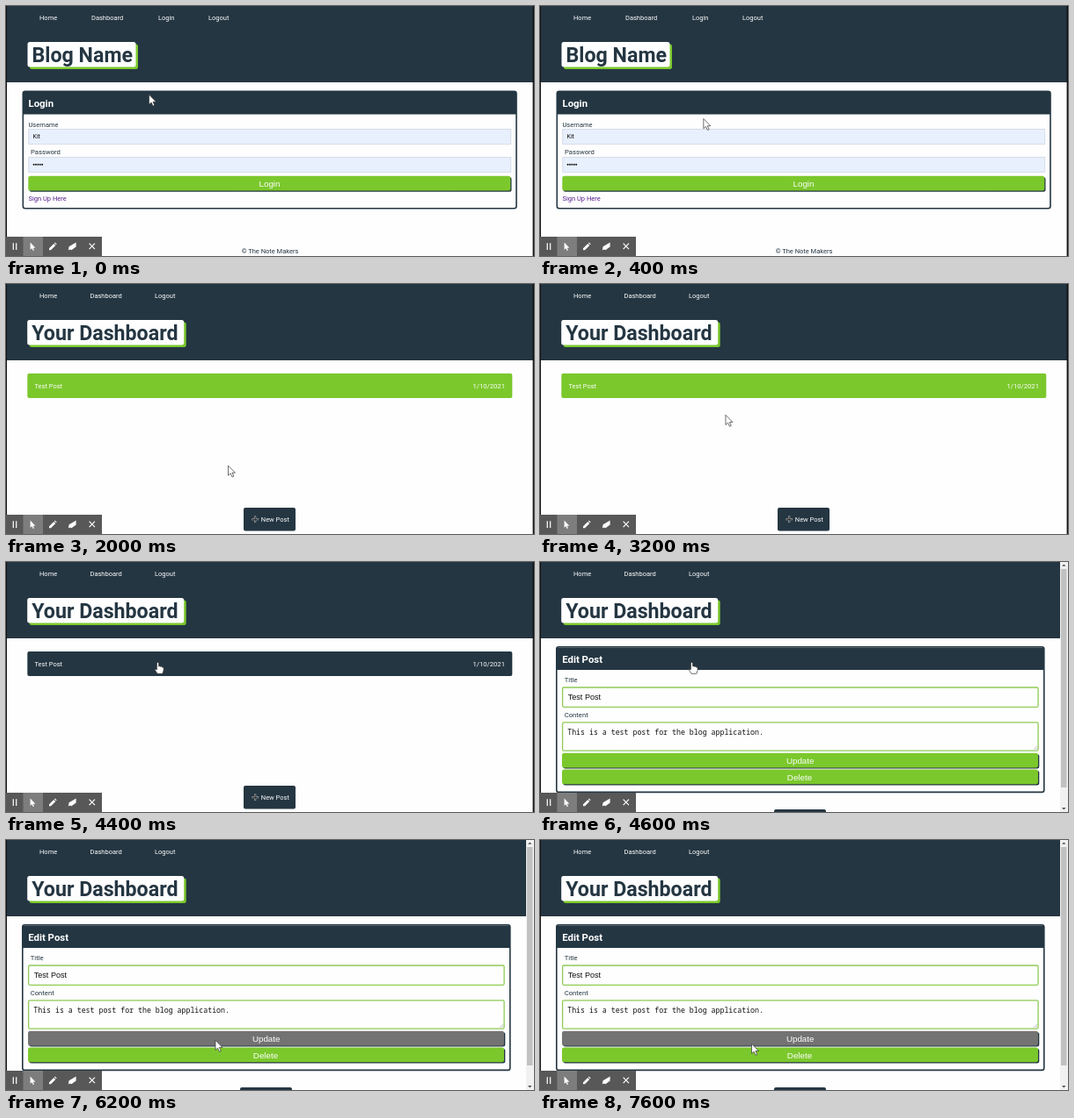
Recreate the animation shown at these times as an HTML page. Size 600x285 px, loop 8000 ms.

```html
<!DOCTYPE html>
<html lang="en">
<head>
<meta charset="utf-8">
<title>Blog walkthrough</title>
<style>
  html, body { margin: 0; width: 100%; height: 100%; overflow: hidden; background: #fefefe; }
  svg { display: block; width: 600px; height: 285px; font: 7.5px Roboto, sans-serif; fill: #243642; }
  .white { fill: #fefefe; }
  .green { fill: #7bc82c; }
  .hover { fill: #737373; }
  .post.hover { fill: #243642; }
  .title { font-size: 23.2px; font-weight: 700; }
  .head { font-size: 11.4px; font-weight: 700; fill: #fff; }
  .label { font-size: 7.7px; }
  .arial { font: 9.8px "Liberation Sans", Arial, sans-serif; }
  .mono { font: 8.25px "Noto Sans Mono", monospace; }
  .black { fill: #111; }
  .mid { text-anchor: middle; }
  .auto { fill: #e8f0fe; stroke: #c9d1de; stroke-width: .7; }
  .field { fill: #fefefe; stroke: #8fca55; stroke-width: 1.3; }
  .card { fill: #fefefe; stroke: #243642; stroke-width: 1.6; }
  .cursor { fill: #fff; stroke: #333; stroke-width: .7; stroke-linejoin: round; }
  .line { fill: none; stroke: #fff; stroke-width: 1.2; }
</style>
</head>
<body>
<svg viewBox="0 0 600 285">
  <rect width="600" height="87"/>

  <g id="login">
    <g class="white">
      <text x="38" y="16">Home</text><text x="97" y="16">Dashboard</text>
      <text x="173" y="16">Login</text><text x="230" y="16">Logout</text>
    </g>
    <rect class="green" x="27" y="43.5" width="123" height="28.5" rx="2.5"/>
    <rect class="white" x="24.5" y="41" width="123" height="28.5" rx="2.5"/>
    <text class="title" x="29.5" y="64">Blog Name</text>
    <rect class="card" x="19.3" y="97.3" width="560.7" height="133.4" rx="2.5"/>
    <path d="M20 98H580V123.5H20z"/>
    <text class="head" x="25.5" y="115">Login</text>
    <text x="25.5" y="137.5">Username</text>
    <rect class="auto" x="25.8" y="140.3" width="548" height="17"/>
    <text class="black" x="30.5" y="151" font-size="7">Kit</text>
    <text class="label" x="28" y="169">Password</text>
    <rect class="auto" x="25.8" y="172.3" width="548" height="17"/>
    <path d="M31.6 180.7H42" stroke="#111" stroke-width="2" stroke-linecap="round" stroke-dasharray="0 2.4"/>
    <rect x="26.5" y="195" width="548" height="16.7" rx="2.5"/>
    <rect id="loginBtn" class="green" x="25.3" y="193.8" width="548" height="16.6" rx="2.5"/>
    <text class="arial white mid" x="299.5" y="205.5">Login</text>
    <text x="25.5" y="221.7" fill="#551a8b">Sign Up Here</text>
    <text class="mid" x="300" y="282.3">© The Note Makers</text>
  </g>

  <g id="dash">
    <g class="white">
      <text x="38" y="16">Home</text><text x="95.5" y="16">Dashboard</text><text x="169" y="16">Logout</text>
    </g>
    <rect class="green" x="26.7" y="43.5" width="178" height="28.5" rx="2.5"/>
    <rect class="white" x="24.2" y="41" width="178" height="28.5" rx="2.5"/>
    <text class="title" x="29.2" y="64">Your Dashboard</text>
  </g>

  <g id="list">
    <rect id="post" class="post green" x="24.3" y="102" width="551" height="28" rx="2"/>
    <text class="white" x="32.5" y="119">Test Post</text>
    <text class="white label" x="567" y="119" text-anchor="end">1/10/2021</text>
    <rect x="270" y="255" width="59" height="26.5" rx="2"/>
    <path d="M279.5 268.3H287M283.2 264.6V272" stroke="#b9bec2" stroke-width="2"/>
    <path d="M280 268.3H286.5M283.2 265.1V271.5" stroke="#222"/>
    <text class="white" x="289.8" y="271">New Post</text>
  </g>

  <g id="edit">
    <rect class="card" x="18.8" y="96.8" width="554" height="165.6" rx="2.5"/>
    <path d="M19 97.5H572.5V123H19z"/>
    <text class="head" x="25.2" y="114.5" font-size="11.6">Edit Post</text>
    <text class="label" x="27.7" y="137">Title</text>
    <rect class="field" x="25.6" y="143" width="540.5" height="22.3" rx="1.5"/>
    <text class="arial black" x="31.7" y="157.3" style="font-size:9.1px">Test Post</text>
    <text class="label" x="27.7" y="177">Content</text>
    <rect class="field" x="25.6" y="182.8" width="540.5" height="32.4" rx="1.5"/>
    <path d="M561 213.8L565 209.8M563.2 213.8L565 212" stroke="#999" stroke-width=".6"/>
    <text class="mono black" x="31.2" y="197">This is a test post for the blog application.</text>
    <rect x="26.3" y="219" width="541" height="16.6" rx="2.5"/>
    <rect id="updateBtn" class="green" x="25" y="217.8" width="541" height="16.6" rx="2.5"/>
    <text class="arial white mid" x="295.7" y="229.8">Update</text>
    <rect x="26.3" y="237.8" width="541" height="16.6" rx="2.5"/>
    <rect class="green" x="25" y="236.6" width="541" height="16.6" rx="2.5"/>
    <text class="arial white mid" x="295" y="248.6">Delete</text>
    <rect x="266" y="282" width="59" height="10" rx="2"/>
    <path d="M591 0H600V285H591z" fill="#f1f1f1"/>
    <path d="M592 8H598.5V257H592z" fill="#c1c1c1"/>
    <path d="M593 4.8L595.3 2.4L597.6 4.8zM593 280L595.3 282.4L597.6 280z" fill="#555"/>
  </g>

  <path d="M0 0H1V285H0z" fill="#111"/>
  <path id="rightEdge" d="M598.6 0H600V285H598.6z" fill="#111"/>

  <g id="toolbar">
    <path d="M0 263H109V285H0z" fill="#585858"/>
    <path d="M19.5 263H42V285H19.5z" fill="#7d7d7d"/>
    <path class="line" d="M8.3 270.3V278M11.7 270.3V278" stroke-width="1.8"/>
    <path class="white" d="M27.6 269.5V277.8L29.5 276.2L30.8 279L32 278.4L30.8 275.7H33.4z"/>
    <path class="white" d="M49 278.2V276.2L54.3 270.9L56.3 272.9L51 278.2zM54.9 270.3L55.7 269.5L57.7 271.5L56.9 272.3z"/>
    <path class="white" d="M70.8 278.6L71.6 274.2L79.6 269.6V274.4L74.4 278.2L72.6 277.6z"/>
    <path class="line" d="M94.6 270.7L101 277.1M101 270.7L94.6 277.1"/>
  </g>

  <g id="pointer" class="cursor">
    <path id="arrow" d="M0 0V11.2L2.6 8.9L4.5 13L6.3 12.2L4.5 8.2H8z"/>
    <path id="hand" d="M-1.1 1Q0-.8 1.1 1V4.6Q2.5 3.9 3 5Q4.3 4.4 4.9 5.6Q6.6 5.2 6.6 7V9.2L5.4 13H-.4L-3.2 8.9Q-3.4 7.2-1.1 8.4z"/>
  </g>
</svg>
<script>
  const LOOP = 8000, STEP = 200;
  const $ = id => document.getElementById(id);
  const show = (id, on) => $(id).style.display = on ? '' : 'none';
  const hover = (id, on) => {
    $(id).classList.toggle('hover', on);
    $(id).classList.toggle('green', !on);
  };

  // Pointer stops: time, x, y
  const stops = [
    [0, 162.5, 101], [1200, 252.5, 207], [2000, 252.5, 207],
    [3000, 214, 152], [4200, 173, 116], [4400, 172.5, 114.3],
    [5400, 172.5, 114.3], [6200, 238, 228.3], [6400, 240, 235],
    [6600, 240, 235], [7600, 240.5, 232.3], [LOOP, 240.5, 232.3]
  ];

  function pointerAt(t) {
    const i = stops.findIndex(s => s[0] > t);
    const [t0, x0, y0] = stops[i - 1], [t1, x1, y1] = stops[i];
    const u = (t - t0) / (t1 - t0), k = u * u * (3 - 2 * u);
    return [x0 + (x1 - x0) * k, y0 + (y1 - y0) * k];
  }

  function draw(now) {
    const t = Math.floor(now % LOOP / STEP) * STEP;
    const page = t < 2000 ? 'login' : t < 4600 ? 'list' : 'edit';
    const [x, y] = pointerAt(t);
    const inside = (top, bottom) => y >= top && y <= bottom;

    for (const id of ['login', 'list', 'edit']) show(id, id === page);
    show('dash', page !== 'login');
    show('rightEdge', page !== 'edit');

    const onPost = page === 'list' && inside(102, 130);
    hover('loginBtn', inside(194, 211));
    hover('post', onPost);
    hover('updateBtn', inside(218, 236));

    const hand = onPost || page === 'edit' && t < 5600;
    show('hand', hand);
    show('arrow', !hand);
    $('pointer').setAttribute('transform', `translate(${x} ${y})`);
  }

  const start = performance.now();
  function tick() {
    draw(performance.now() - start);
    requestAnimationFrame(tick);
  }
  tick();
</script>
</body>
</html>
```
